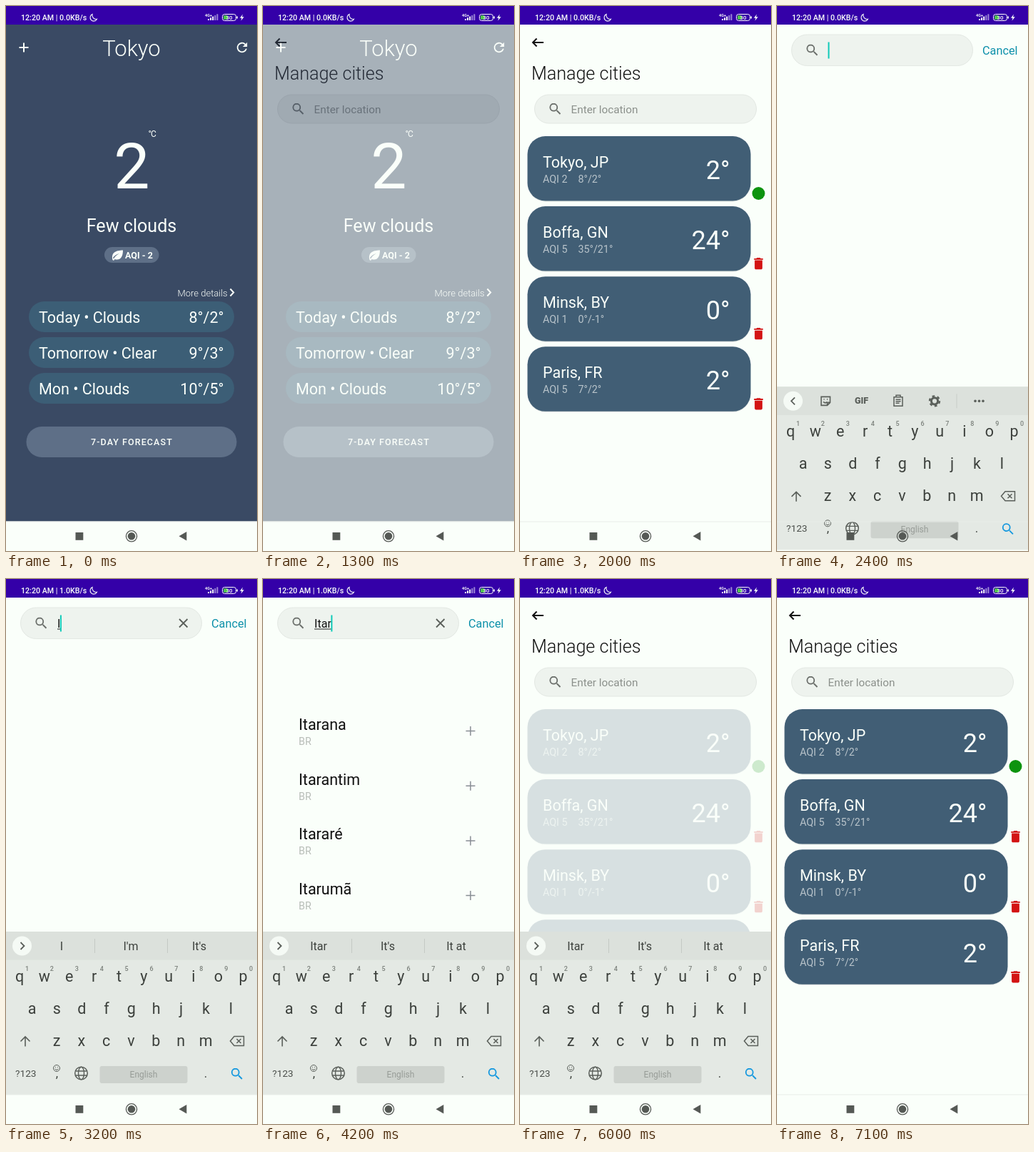
An HTML page for the animation above (8000 ms loop, 352 px wide and 762 px high).

```html
<!DOCTYPE html>
<html lang="en">
<head>
<meta charset="utf-8">
<title>Weather cities</title>
<style>
html, body { margin: 0; width: 100%; height: 100%; overflow: hidden; background: #fafffa; }
svg { display: block; width: 352px; height: 762px; font-family: Roboto, sans-serif; }
text { white-space: pre; }
</style>
</head>
<body>
<svg id="stage" viewBox="0 0 352 762"></svg>
<script>
const WHITE = '#fafffa', GREY = '#5a5f5a', CARD = '#415e75';
const LOOP = 8000, STEP = 100;

// Markup helpers
const text = (x, y, size, s, fill = WHITE, more = '') =>
  `<text x="${x}" y="${y}" font-size="${size}" fill="${fill}" ${more}>${s}</text>`;
const rect = (x, y, w, h, r, fill, more = '') =>
  `<rect x="${x}" y="${y}" width="${w}" height="${h}" rx="${r}" fill="${fill}" ${more}/>`;
const circle = (x, y, r, fill, more = '') => `<circle cx="${x}" cy="${y}" r="${r}" fill="${fill}" ${more}/>`;
const line = (d, color, width = 2, more = '') =>
  `<path d="${d}" fill="none" stroke="${color}" stroke-width="${width}" ${more}/>`;
const icon = (x, y, fill, d, scale = .9) =>
  `<path transform="translate(${x} ${y}) scale(${scale}) translate(-12 -12)" fill="${fill}" d="${d}"/>`;
const group = (id, body) => `<g id="${id}">${body}</g>`;
const MID = 'text-anchor="middle"', END = 'text-anchor="end"';

const REFRESH = 'M17.65 6.35A8 8 0 1 0 19.73 14h-2.08A6 6 0 1 1 16.22 7.78L13 11h7V4z';
const SEARCH = 'M15.5 14h-.79l-.28-.27A6.5 6.5 0 1 0 13.73 14.43l.27.28v.79l5 4.99L20.49 19zM9.5 14a4.5 4.5 0 1 1 0-9 4.5 4.5 0 0 1 0 9z';
const TRASH = 'M6 19c0 1.1.9 2 2 2h8c1.1 0 2-.9 2-2V7H6zM19 4h-3.5l-1-1h-5l-1 1H5v2h14z';

function statusBar() {
  const bars = [0, 1, 2, 3, 4].map(i => rect(283 + i * 3.1, 18 - i * 1.7, 2, 2 + i * 1.7, .5, i < 3 ? WHITE : '#9c86d6')).join('');
  return rect(0, 0, 352, 26, 0, '#3400a8') +
    text(21, 20, 10.65, '', WHITE, 'id="clock" font-weight="500"') +
    line('M121 11.5A5 5 0 1 0 127.5 18.3A5.5 5.5 0 0 1 121 11.5Z', WHITE, 1.1) +
    text(279, 14.5, 5.5, '4G+', WHITE, 'font-weight="700"') + bars +
    rect(303.5, 11.5, 19, 9, 3, 'none', `stroke="${WHITE}"`) +
    rect(305, 13, 6, 6, 1.5, '#4fc24f') + rect(323.4, 14.2, 1.6, 3.6, .8, WHITE) +
    text(313, 19, 8, '30', WHITE, MID + ' font-weight="500"') +
    `<path d="M332 11.5l-4 5.2h2.6l-1.2 4 4.4-5.4h-2.8z" fill="${WHITE}"/>`;
}

function home() {
  const days = [['Today • Clouds', '8°/2°'], ['Tomorrow • Clear', '9°/3°'], ['Mon • Clouds', '10°/5°']];
  return rect(0, 25, 352, 695.5, 0, '#3a4a64') +
    line('M18.5 58h13M25 51.5v13', WHITE) + icon(331, 58, WHITE, REFRESH) +
    text(176, 70, 31, 'Tokyo', WHITE, MID + ' font-weight="300"') +
    text(176.5, 255, 89.5, '2', WHITE, MID) +
    text(199.5, 183, 12, '°C', WHITE, 'letter-spacing="-1"') +
    text(176, 316, 25.1, 'Few clouds', WHITE, MID) +
    rect(138, 337, 76.5, 22, 11, '#5e6f87') +
    `<path d="M149.500 355C147 345 154 341.500 164 341.500C164 351 160 356.500 152.500 354L151 356ZM151 353.500Q153.500 348.500 159 346Q153 347.500 150 352Z" fill="${WHITE}" fill-rule="evenodd"/>` +
    text(167, 353, 12.5, 'AQI - 2', WHITE, 'font-weight="700"') +
    text(240.5, 405.5, 13, 'More details', WHITE, 'font-weight="300"') + line('M314.500 395.500l4.700 5-4.700 5', WHITE) +
    days.map(([day, range], i) => rect(32, 413 + i * 50, 288, 43, 21.5, '#3c5e76') +
      text(46, 442.5 + i * 50, 21.5, day) + text(305.5, 442.5 + i * 50, 21.5, range, WHITE, END)).join('') +
    rect(28.5, 588, 295, 43, 21.5, '#5e6f87') +
    text(176.5, 614, 12.5, '7-DAY FORECAST', WHITE, MID + ' font-weight="500" letter-spacing="1.1"');
}

const pill = (y, w, h) => rect(20.5, y, w, h, h / 2, '#eef3ee', 'stroke="#e3e8e3"') + icon(49.5, y + h / 2, '#6c706c', SEARCH);

function manage() {
  const cities = [['Tokyo, JP', 2, '8°/2°', 2], ['Boffa, GN', 5, '35°/21°', 24], ['Minsk, BY', 1, '0°/-1°', 0], ['Paris, FR', 5, '7°/2°', 2]];
  const cards = cities.map(([name, aqi, range, temp], i) => `<g transform="translate(0 ${i * 98.1})">` +
    rect(10.5, 183, 313, 90.5, 25, '#dfe5e1') + rect(10.5, 182, 313, 90.5, 25, CARD) +
    text(32, 226, 21.5, name) + text(32, 247, 14.3, 'AQI ' + aqi, '#b9c4cb') + text(81.5, 247, 14.3, range, '#b9c4cb') +
    text(294.5, 241.5, 36, temp + '°', WHITE, END) +
    (i ? icon(334.5, 262, '#d31414', TRASH) : circle(334.5, 262, 9, '#0d930f')) + '</g>').join('');
  return rect(0, 25.5, 352, 696, 0, WHITE) +
    line('M33 51H18M23.500 45.500L18 51l5.500 5.500', '#111') +
    text(16, 103, 25.1, 'Manage cities', '#111', 'font-weight="300"') +
    pill(124, 311, 40) + text(71.5, 150, 15.3, 'Enter location', '#8b908b') + group('cards', cards);
}

function search() {
  const found = ['Itarana', 'Itarantim', 'Itararé', 'Itarumã'];
  return rect(0, 25.5, 352, 696, 0, WHITE) + pill(40, 254, 43.5) +
    text(288, 68, 16.3, 'Cancel', '#0c90aa') +
    text(72, 68, 16.1, '', '#111', 'id="query"') + rect(72, 69.5, 0, 1, 0, '#222', 'id="underline"') +
    rect(71.5, 50.5, 2, 23, 0, '#0fcab8', 'id="cursor"') +
    group('clear', line('M243 56l11.500 11.500M254.500 56l-11.500 11.500', GREY, 1.8)) +
    group('results', found.map((name, i) => {
      const y = i * 76.7;
      return text(50, 211 + y, 21.5, name, '#111') + text(50, 232 + y, 14.3, 'BR', '#b8bdb8') +
        line(`M284.500 ${212.5 + y}h13M291 ${206 + y}v13`, '#888d94', 1.5);
    }).join(''));
}

const keys = {};
['qwertyuiop', 'asdfghjkl', 'zxcvbnm'].forEach((row, r) =>
  [...row].forEach((c, i) => keys[c] = [[19, 36.5, 71][r] + i * 34.85, 556 + r * 45]));

function keyboard() {
  const tools = line('M25 508l-5 5 5 5', GREY, 1.8) +
    line('M62 507h12.500v8l-4 4H62zM70.500 519v-4h4M65.500 510.500h1M70 510.500h1M65 514q3 3 5 0', GREY, 1.6) +
    text(118.5, 517, 12.5, 'GIF', GREY, MID + ' font-weight="900"') +
    line('M164 507.500h12v12.500h-12zM167 507v-2h6v2M166.500 511h7M166.500 513.500h7M166.500 516h5', GREY, 1.5) +
    circle(221, 513, 4.6, 'none', `stroke="${GREY}" stroke-width="3"`) +
    circle(221, 513, 7, 'none', `stroke="${GREY}" stroke-width="2.4" stroke-dasharray="3.67 3.66"`) +
    line('M252 503v20', '#c8cdc8', 1) + [278, 283.5, 289].map(x => circle(x, 513, 1.8, GREY)).join('');
  const words = line('M20.500 508l5 5-5 5', GREY, 1.8) + line('M124.500 503v20M226.500 503v20', '#c4c9c4', 1) +
    [78, 175, 271].map((x, i) => text(x, 519, 16, '', '#3c403c', `${MID} id="word${i}"`)).join('');
  const letters = Object.entries(keys).map(([c, [x, y]]) =>
    text(x, y + 7, 21.5, c, '#3c403c', MID + ' class="key"')).join('');
  const digits = [...'1234567890'].map((n, i) =>
    text(29.5 + i * 34.9, 548, 9, n, '#7b807b', MID + ' font-weight="500"')).join('');
  const bottom = text(13, 696, 13.7, '?123', '#4a4e4a') + text(71.5, 697, 17, ',', '#3c403c', MID) +
    circle(71, 684, 4.5, 'none', `stroke="${GREY}"`) + line('M69 682.500h1M72 682.500h1M68.500 685q2.500 3 5 0', GREY, 1) +
    circle(105.5, 691, 8.8, 'none', `stroke="${GREY}" stroke-width="1.5"`) +
    `<ellipse cx="105.5" cy="691" rx="4" ry="8.800" fill="none" stroke="${GREY}" stroke-width="1.400"/>` +
    line('M97.500 688h16M97.500 694h16', GREY, 1.4) +
    rect(131.5, 681, 123, 24, 3, '#cdd2cd') + text(193, 697, 12, 'English', '#979c97', MID) +
    text(280, 697, 17, '.', '#3c403c', MID) + icon(324, 692, '#1799df', SEARCH);
  return rect(0, 493, 352, 228, 0, '#e4e9e4') + rect(0, 493, 352, 39.5, 0, '#dce1dc') +
    circle(22.5, 513, 13.5, '#f5faf5') + group('tools', tools) + group('words', words) + letters + digits +
    line('M27 653.500v-13M20.500 646.500l6.500-6.500 6.500 6.500', GREY, 1.6, 'id="shift"') +
    line('M314.500 646l5.500-6.500h13.500v13H320zM323.500 643l6 6M329.500 643l-6 6', GREY, 1.5) + bottom +
    group('popup', rect(-19.5, -67, 39, 90, 6, '#f5faf5') + text(0, -32, 27, '', '#3c403c', MID + ' id="popupKey"'));
}

const nav = rect(0, 720.5, 352, 1, 0, '#eaeeea') + rect(97.5, 736, 10.8, 10.8, 0, '#555955') +
  circle(176, 741.3, 7.6, 'none', 'stroke="#555955" stroke-width="1.300"') + circle(176, 741.3, 5.3, '#555955') +
  '<path d="M242.500 741.300l10.800-6.200v12.400z" fill="#555955"/>';

document.getElementById('stage').innerHTML = rect(0, 0, 352, 762, 0, WHITE) +
  group('home', home()) + group('manage', manage()) + group('search', search()) +
  group('keyboard', keyboard()) + nav + statusBar();

const el = id => document.getElementById(id);
const show = (id, opacity) => el(id).setAttribute('opacity', Number(opacity));
const set = (id, s) => el(id).textContent = s;
const ramp = (t, start, length) => Math.min(1, Math.max(0, (t - start) / length));
const keyNodes = [...document.querySelectorAll('.key')];

// Each key shows its popup for one step, then types its letter.
const presses = [['I', 3000], ['t', 3500], ['a', 3700], ['r', 3900]];
const guesses = [['', '', ''], ['I', "I'm", "It's"], ['It', "It's", 'It at'], ['Ita', "It's", 'It at'], ['Itar', "It's", 'It at']];

function draw(t) {
  const searching = t >= 2200 && t < 5800;
  show('home', t < 1500);
  show('manage', searching ? 0 : ramp(t, 1130, 300));
  show('cards', t < 2200 ? ramp(t, 1457, 120) : ramp(t, 5978, 120));
  show('search', searching);

  const typed = presses.filter(p => t >= p[1] + STEP).map(p => p[0]);
  set('query', typed.join(''));
  const width = typed.length ? el('query').getComputedTextLength() : 0;
  el('underline').setAttribute('width', width);
  el('cursor').setAttribute('x', 71.5 + width);
  show('cursor', t >= 2400 && !(t >= 2900 && t < 3100) && !(t >= 4800 && t < 5300));
  show('clear', width > 0);
  show('results', t >= 4100);

  const up = 1 - ramp(t, 2310, 203), down = ramp(t, 6050, 150);
  el('keyboard').setAttribute('transform', `translate(0 ${228 * (up ** 3 + down ** 2)})`);
  show('keyboard', t > 2310 && t < 6200);
  show('tools', !typed.length);
  show('words', typed.length > 0);
  guesses[typed.length].forEach((s, i) => set('word' + i, s));

  const caps = t >= 2900 && t < 3100;
  keyNodes.forEach((k, i) => k.textContent = Object.keys(keys)[i][caps ? 'toUpperCase' : 'toLowerCase']());
  el('shift').setAttribute('stroke', caps ? '#1799df' : GREY);
  const press = presses.find(p => t >= p[1] && t < p[1] + STEP);
  show('popup', Boolean(press));
  if (press) {
    el('popup').setAttribute('transform', `translate(${keys[press[0].toLowerCase()]})`);
    set('popupKey', press[0]);
  }
  set('clock', `12:20 AM | ${t >= 3000 && t < 7100 ? 1 : 0}.0KB/s`);
}

function tick() {
  const t = performance.now() % LOOP;
  draw(Math.floor(t / STEP) * STEP);
  requestAnimationFrame(tick);
}
tick();
</script>
</body>
</html>
```
